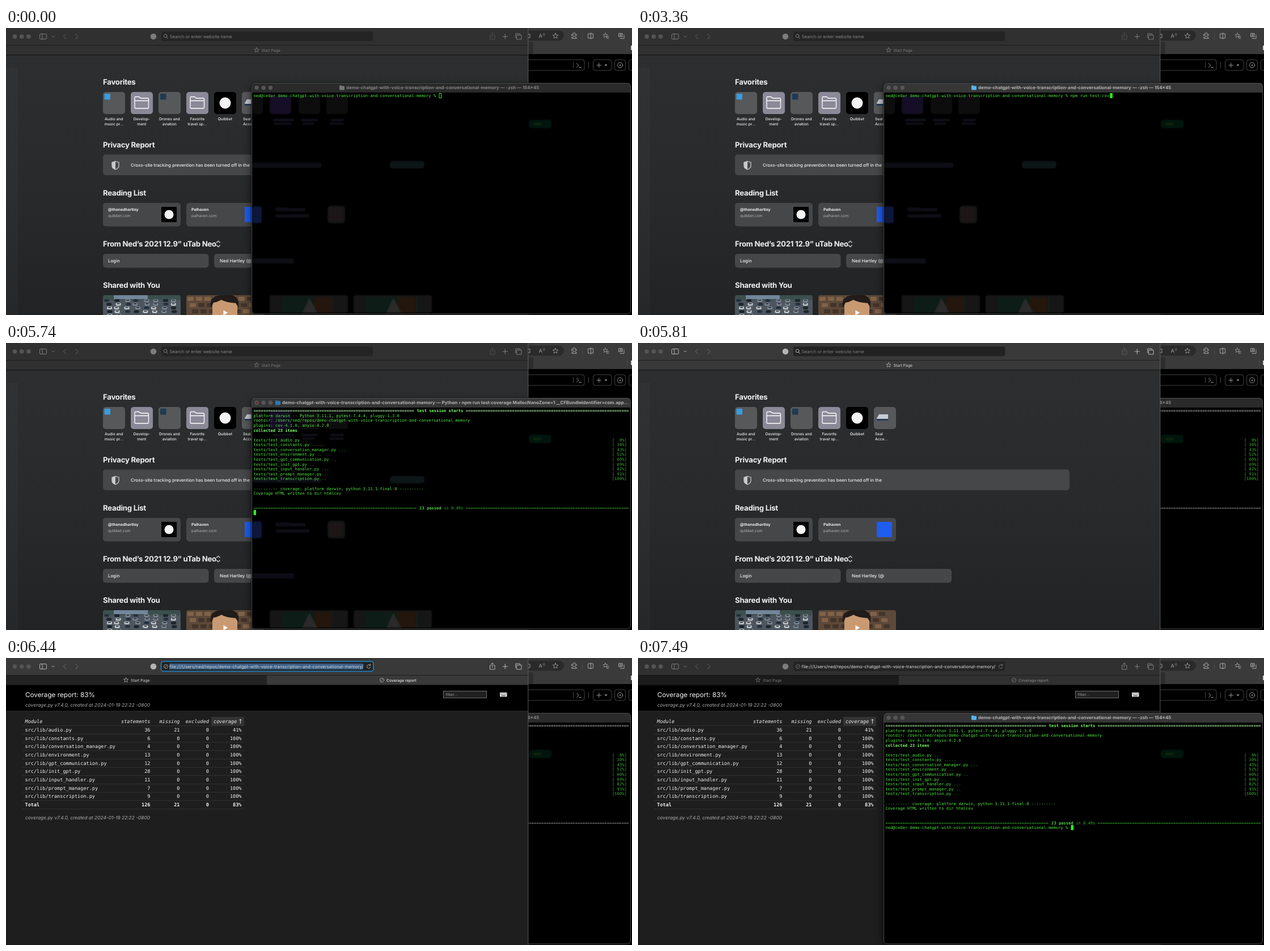
Animation of 1104 by 507 pixels, one loop 8000 ms. Source, as an HTML page:

```html
<!DOCTYPE html>
<html lang="en">
<head>
<meta charset="utf-8">
<title>Test coverage demo</title>
<style>
html, body { margin: 0; width: 100%; height: 100%; overflow: hidden; background: #000; }
svg { position: absolute; inset: 0; width: 100%; height: 100%; text-rendering: geometricPrecision; }
text { font-family: Inter, "Open Sans", sans-serif; white-space: pre; }
.mono, .row text, #prompt { font-family: "DejaVu Sans Mono", monospace; }
.row text, #prompt { font-size: 7.147px; fill: #4fe83f; }
.row .bold { font-weight: 700; fill: #7dff6c; }
.row .ansi { fill: #39b030; }
.row .strong { font-weight: 700; fill: #52d045; }
.row .rule { fill: #a3e39a; }
.line { fill: none; stroke: var(--ink); stroke-linecap: round; stroke-linejoin: round; }
.dim { stroke: var(--dim); }

#browser { z-index: 1; --bar: #303030; --tab: #1b1b1b; --ink: #7c7c7c; --dim: #4d4d4d; --label: #7b7b7b;
  --field: #242424; --hint: #868686; --red: #555; --amber: #555; --green: #555; --url: #dadada; }
#browser.on { z-index: 3; --bar: #393939; --tab: #232323; --ink: #b4b4b4; --dim: #5a5a5a; --label: #d8d8d8;
  --field: #222; --hint: #7c7c7c; }
#terminal { z-index: 2; --bar: #2a2a2b; --ink: #858585; --folder: #777; --red: #565656; --amber: #565656; --green: #565656; }
#terminal.on { --bar: #363637; --ink: #b4b4b4; --folder: #55b4ea; }
#terminal.busy { --folder: #2f76ad; }
.on { --red: #fe5f57; --amber: #febc2e; --green: #28c840; }
#terminal:not(.on) .rule, #terminal:not(.on) .row:last-of-type .ansi { fill: #939793; }

.page, .ring, #pick, #dot { display: none; }
.start .p-start, .blank .p-blank, .report .p-report { display: inline; }
#browser.on:not(.start) .ring { display: inline; }
#browser.on.report #pick, #terminal.busy #dot { display: inline; }
#browser.on.report .old { fill: #8b8b8b; }
</style>
</head>
<body>
<svg id="desk" viewBox="0 0 1104 507"></svg>
<svg id="browser" viewBox="0 0 1104 507"></svg>
<svg id="terminal" viewBox="0 0 1104 507"></svg>
<script>
const $ = id => document.getElementById(id);
const REPO = 'demo-chatgpt-with-voice-transcription-and-conversational-memory';
const PROMPT = `ned@cedar ${REPO} % `;
const COMMAND = 'npm run test:coverage';
const KEYS = [1190, 1470, 1680, 1820, 1890, 2030, 2240, 2310, 2310, 2450, 2520,
  2660, 2870, 3080, 3220, 3360, 3570, 3640, 3850, 3920, 3990];
const OUTPUT = [[5040, 1], [5110, 4], [5180, 5], [5250, 9], [5320, 12], [5390, 15], [5670, 21]];
// module, tests, statements, missing
const MODULES = [['audio', 2, 36, 21], ['constants', 5, 6, 0], ['conversation_manager', 3, 4, 0],
  ['environment', 2, 13, 0], ['gpt_communication', 2, 12, 0], ['init_gpt', 2, 28, 0],
  ['input_handler', 3, 11, 0], ['prompt_manager', 2, 7, 0], ['transcription', 2, 9, 0]];

const rect = (x, y, w, h, fill, r = 0, more = '') =>
  `<rect x="${x}" y="${y}" width="${w}" height="${h}" rx="${r}" style="fill:${fill}" ${more}/>`;
const disc = (x, y, r, fill) => `<circle cx="${x}" cy="${y}" r="${r}" style="fill:${fill}"/>`;
const path = (d, w = 1, cls = '') => `<path class="line ${cls}" d="${d}" stroke-width="${w}"/>`;
// y is the middle of the lower-case line
const text = (x, y, s, size, fill, weight = 400, more = '') =>
  `<text x="${x}" y="${y + size * .36}" font-size="${size}" font-weight="${weight}" style="fill:${fill}" ${more}>${s}</text>`;
const MID = 'text-anchor="middle"', END = 'text-anchor="end"';
const lights = (x, y, r) => ['red', 'amber', 'green'].map((c, i) => disc(x + i * 12.2, y, r, `var(--${c})`)).join('');
const star = (x, y, r, w = .8) => path('M' + Array.from({ length: 10 }, (_, i) => {
  const a = i * Math.PI / 5, k = i % 2 ? r * .45 : r;
  return `${(x + k * Math.sin(a)).toFixed(2)} ${(y - k * Math.cos(a)).toFixed(2)}`;
}).join('L') + 'Z', w);
let seed = 7;
const rnd = () => (seed = seed * 16807 % 2147483647) / 2147483647;

function desk() {
  return `<g style="--ink:#a5a5a5;--dim:#555">` + rect(900, 0, 204, 46, '#3a3a3a') + rect(900, 25, 30, 21, '#2d2d2d', 4) +
    rect(880, 4.5, 104, 18, '#2a2a2a', 9) +
    path('M921 11h3v6h-3', .9) + text(939.5, 14, 'A', 9, '#a5a5a5') + path('M947 10q1.5 1.5 0 3M949 9q2.2 2.500 0 5', .6) +
    star(969, 14, 5) +
    path('M998 11h2.500a1.800 1.800 0 1 1 3 0h2.500v2.500a1.800 1.800 0 1 0 0 3v2h-8v-2.500a1.800 1.800 0 1 0 0-2.500z', 1) +
    path('M1016.500 9v10', .7, 'dim') + path('M1027 10h8.500v8h-8.500zM1031.300 8.500v11', 1) +
    star(1057, 13, 4.200) + path('M1059 15h4M1059 18h4', 1) +
    path('M1081 9.500h6v6h-6zM1083.500 18.500h6.500v-6.500M1084 10.500v4M1082 12.500h4', 1) +
    path('M1095.500 30v9', .7, 'dim') + rect(1102, 31, 2, 8, '#d9d0c4') +
    `<g fill="none" stroke="#4b4b4b" stroke-width=".9"><rect x="860" y="56" width="160" height="19" rx="4"/>
     <path d="M1000.500 60v11M1027.500 60v11"/><rect x="1035.500" y="56" width="32.500" height="19" rx="4"/>
     <rect x="1073.500" y="56" width="19" height="19" rx="4"/><rect x="1098.500" y="56" width="19" height="19" rx="4"/></g>` +
    path('M1006.500 62.500l3.500 3.300-3.500 3.300M1010.500 69.500h4', .9) + path('M1042 65.800h7.500M1045.700 62v7.500', .9) +
    `<path d="M1055.500 64.500h5l-2.500 2.800z" fill="#a5a5a5"/>` +
    path('M1087.700 65.700a4.600 4.600 0 1 1-9.200 0a4.600 4.600 0 1 1 9.200 0', .9) + disc(1083.1, 65.7, 1.1, '#a5a5a5') + '</g>';
}

function folderTile(x) {
  const L = x + 7;
  return rect(x, 113, 39, 39, '#8b8998', 5) +
    `<path d="M${L} 125v-2q0-1.500 1.500-1.500h6l3 2.500h12q2 0 2 2v14q0 2-2 2h-20.500q-2 0-2-2zM${L} 128.500h24.500" fill="none" stroke="#fff" stroke-width="1.300"/>`;
}

function traffic() {
  let s = rect(171, 472, 137, 40, '#4d565f', 4) + rect(171, 472, 137, 9, '#3b4f4c', 4) + rect(190, 472, 60, 7, '#71869a');
  for (let i = 0; i < 34; i++) {
    const y = 479 + (i >> 3) * 6.5, x = 173 + (i % 8) * 16.5 + rnd() * 6, c = ['#20262d', '#c8ccd0', '#7f8994', '#2b3947'][rnd() * 4 | 0];
    s += rect(x, y, 9, 5, c, 1.8) + rect(x + 2, y + 1, 5, 1.5, '#19222b');
  }
  return s;
}

function portrait() {
  let s = rect(318, 472, 137, 40, '#5d4939', 4);
  for (let i = 0; i < 24; i++) s += rect(320 + (i % 8) * 15 + (i >> 3) * 4, 475 + (i >> 3) * 11, 11, 7, rnd() > .5 ? '#806248' : '#443429', 1);
  return s + `<path d="M364 507v-17q4-16 22-16t22 16v17z" fill="#c99a72"/>
    <path d="M361 494q-3-20 16-22h22q14 5 11 22l-5-8q-18-1-25-6-9 5-14 5z" fill="#211c19"/>
    <path d="M383.500 498.500v9l7.500-4.500z" fill="#fff"/>`;
}

function startPage() {
  const gray = '#464748', title = (y, s) => text(171, y, s, 13.2, '#f1f1f1', 700, 'letter-spacing="-.25"');
  const names = [['Audio and', 'music pr...'], ['Develop-', 'ment'], ['Drones and', 'aviation'],
    ['Favorite', 'travel sp...'], ['Quibbet'], ['Seal', 'Acce...']];
  let s = rect(0, 48, 921, 459, 'url(#paper)') + rect(0, 70, 21, 437, '#ffffff05') +
    title(95.5, 'Favorites') + title(206, 'Privacy Report') + title(291.5, 'Reading List') +
    title(381.5, 'From Ned’s 2021 12.9” uTab Neo') + title(454.5, 'Shared with You');
  [0, 2, 5].forEach(i => s += rect(171 + i * 49, 113, 39, 39, '#57585a', 5));
  s += folderTile(220) + folderTile(318) + rect(367, 113, 39, 39, '#000', 5) + disc(386.5, 132.5, 10, '#f4f4f4') +
    rect(173.5, 116, 10.5, 10.5, '#3a9bdc', 1) + rect(272, 116, 10.5, 10.5, '#1e3a52', 1) +
    `<path d="M421 133l4-7h16v10h-19z" fill="#c5ccd3"/><path d="M421 134h20v3h-20z" fill="#263c55"/>`;
  names.forEach((n, i) => n.forEach((w, j) =>
    s += i < 5 ? text(190.3 + i * 49, 160.5 + j * 9, w, 6.7, '#f0f0f0', 500, MID) : text(418, 160.5 + j * 9, w, 6.7, '#f0f0f0', 500)));
  s += rect(171, 223.5, 590, 36.5, gray, 5) +
    `<path d="M193 235.500l6 2v6q0 4-6 6.500q-6-2.500-6-6.500v-6z" fill="none" stroke="#c9c9c9" stroke-width="1.300"/>
     <path d="M193 235.500v14.500q-6-2.500-6-6.500v-6z" fill="#c9c9c9"/>` +
    text(220, 242, 'Cross-site tracking prevention has been turned off in the', 7.78, '#f0f0f0', 500);
  [[171, '@thenedhartley', 'quibbet.com'], [318, 'Palhaven', 'palhaven.com']].forEach(([x, a, b]) =>
    s += rect(x, 309, 137, 41.5, gray, 5) + text(x + 9, 320.5, a, 6.8, '#f0f0f0', 700) + text(x + 9, 331.5, b, 6.7, '#b5b5b5'));
  return s + rect(274, 316, 27, 27, '#000', 1) + disc(287.5, 329.5, 8, '#f4f4f4') + rect(421, 316, 27, 27, '#1f5df0', 1) +
    `<path d="M371 379.500l3.300-3.200 3.300 3.200M371 383.500l3.300 3.200 3.300-3.200" fill="none" stroke="#e5e5e5" stroke-width="1.100"/>` +
    rect(171, 399, 186.5, 24.5, gray, 5) + rect(367, 399, 186, 24.5, gray, 5) +
    text(180, 411.5, 'Login', 7.8, '#f0f0f0', 500) + text(377, 411.5, 'Ned Hartley (@', 7.8, '#f0f0f0', 500) + traffic() + portrait();
}

function reportPage() {
  const stamp = 'coverage.py v7.4.0, created at 2024-01-19 22:22 -0800', it = 'font-style="italic"';
  const cell = (x, y, s, more = '', weight = 400) => text(x, y, s, 8.55, '#f3f3f3', weight, `class="mono" ${more}`);
  const cols = [254.5, 306.5, 358, 415.5];
  let s = rect(0, 48, 921, 459, '#1e1e1e') + rect(0, 48, 921, 45.5, '#000') + rect(0, 93.5, 921, .8, '#333') +
    text(34, 65, 'Coverage report: 83%', 11.7, '#f5f5f5', 400) + text(34, 82.5, stamp, 8.36, '#b0b0b0', 400, it) +
    rect(771.5, 58.5, 76, 12, '#202020', 0, 'stroke="#7b7b7b" stroke-width=".9"') + text(775.5, 64.7, 'filter...', 7, '#9a9a9a') +
    rect(871, 61, 12.5, 7.5, '#eee', 1);
  for (let i = 0; i < 10; i++) s += rect(872.2 + i % 5 * 2.2, 62.4 + (i / 5 | 0) * 2, 1, 1, '#222');
  s += rect(873.5, 66.4, 7.5, .9, '#222') + rect(362, 104, 58, 15, '#343434') + cell(33.5, 112, 'Module', it);
  ['statements', 'missing', 'excluded'].forEach((h, i) => s += cell(cols[i], 112, h, `${it} ${END}`));
  s += cell(366, 112, 'coverage', it) + `<path d="M413.500 115.500v-7M411.500 110.300l2-2.300 2 2.300" fill="none" stroke="#eee" stroke-width=".9"/>`;
  const rows = MODULES.map(([n, , st, miss]) => [`src/lib/${n}.py`, st, miss]);
  rows.push(['Total', 126, 21]);
  rows.forEach(([n, st, miss], i) => {
    const y = 126.8 + i * 14.7, w = i == 9 ? 700 : 400;
    s += rect(29, y - 7.6, 391, .7, '#3a3a3a') + cell(33.5, y, n, '', w);
    [st, miss, 0, Math.floor(100 * (st - miss) / st) + '%'].forEach((v, j) => s += cell(cols[j], y, v, END, w));
  });
  return s + rect(29, 266.5, 391, .7, '#3a3a3a') + text(34, 282, stamp, 8.36, '#b0b0b0', 400, it);
}

function browser() {
  const url = `file:///Users/ned/repos/${REPO}/`;
  const compass = (x, y) => path(`M${x - 3.6} ${y}a3.600 3.600 0 1 1 7.200 0a3.600 3.600 0 1 1-7.200 0M${x - 1.5} ${y + 1.5}l3-3`, .8);
  return `<defs><linearGradient id="paper" x2="0" y2="1"><stop stop-color="#2d2e2f"/><stop offset=".5" stop-color="#282a2b"/>
    <stop offset="1" stop-color="#222324"/></linearGradient></defs>` + rect(0, 0, 921, 507, '#1e1e1e') +
    `<g class="page p-start">${startPage()}</g><g class="page p-report">${reportPage()}</g>` +
    rect(0, 0, 921, 48, 'var(--bar)') + `<rect id="oldTab" y="30" height="18" style="fill:var(--tab)"/>` +
    rect(0, 30, 921, .8, '#171717') + rect(0, 47.3, 921, 1, '#101010') + lights(15.5, 15, 3.8) +
    path('M61 10.500h9q1.500 0 1.500 1.500v6q0 1.500-1.500 1.500h-9q-1.500 0-1.500-1.500v-6q0-1.500 1.500-1.500zM64 10.500v9', 1) +
    path('M81.200 14l2 2 2-2', 1) + path('M105.500 11l-4 4 4 4M123 11l4 4-4 4', 1.2, 'dim') + disc(260, 15, 5.3, 'var(--ink)') +
    rect(274, 6.3, 373.5, 17, 'var(--field)', 4) +
    `<rect class="ring" x="273.500" y="6" width="374.500" height="17.600" rx="4.500" fill="none" stroke="#2474ab" stroke-width="2"/>` +
    `<g class="page p-start p-blank">` + path('M284 14a2.900 2.900 0 1 1-5.800 0a2.900 2.900 0 1 1 5.800 0M283.200 16.200l2.600 2.600', 1) +
    text(288.5, 15, 'Search or enter website name', 7.8, 'var(--hint)') + `<rect class="ring" x="288.700" y="10" width=".9" height="10" fill="#3d9be0"/></g>` +
    `<g class="page p-report"><rect id="pick" x="288" y="9.800" width="342" height="10.400" fill="#3b5f86"/>` + compass(282, 15) +
    text(288.5, 15, url, 7.79, 'var(--url)') + path('M642.500 13a3.300 3.300 0 1 0 .5 3M642.700 10.700v2.500h-2.500', .9) + '</g>' +
    `<g class="page p-start p-blank">${path('M855.500 13h-2v7h8.500v-7h-2M857.700 16.500v-7.500M855.500 11l2.200-2.200 2.200 2.200', 1, 'dim')}</g>` +
    `<g class="page p-report">${path('M855.500 13h-2v7h8.500v-7h-2M857.700 16.500v-7.500M855.500 11l2.200-2.200 2.200 2.200', 1)}</g>` +
    path('M876 15h8.500M880.200 10.700v8.500', 1.1) + path('M901 12.500h8v7.500h-8zM898.800 17.500v-7.500h7.500v2', 1) +
    `<g id="startTab">` + star(-18.5, 39, 4.3) + text(-10, 39.3, 'Start Page', 6.8, 'var(--label)', 400, 'class="old"') + '</g>' +
    `<g class="page p-report">` + compass(663, 39) + text(671, 39.3, 'Coverage report', 6.7, 'var(--label)', 600) + '</g>' +
    rect(920.4, 0, .9, 507, '#626262');
}

const CW = 4.303, LH = 8.576, LEFT = 436.5, TOP = 115.3;
const cell = (row, col, s, cls = '') => `<text class="${cls}" x="${LEFT + col * CW}" y="${TOP + row * LH + 7}">${s}</text>`;

function output() {
  const eq = n => '='.repeat(n), rows = [];
  const add = (...runs) => rows.push(runs.map(r => cell(rows.length, ...r)).join(''));
  add([0, eq(66), 'rule bold'], [67, 'test session starts', 'bold'], [87, eq(67), 'rule bold']);
  add([0, 'platform darwin -- Python 3.11.1, pytest-7.4.4, pluggy-1.3.0']);
  add([0, `rootdir: /Users/ned/repos/${REPO}`]);
  add([0, 'plugins: cov-4.1.0, anyio-4.2.0']);
  add([0, 'collected 23 items', 'bold']);
  add();
  let done = 0;
  MODULES.forEach(([n, k]) => {
    const name = `tests/test_${n}.py `;
    done += k;
    add([0, name], [name.length, '.'.repeat(k), 'ansi'], [147, `[${String(Math.floor(done * 100 / 23)).padStart(3)}%]`, 'ansi']);
  });
  add();
  add([0, '---------- coverage: platform darwin, python 3.11.1-final-0 ----------']);
  add([0, 'Coverage HTML written to dir htmlcov']);
  add();
  add();
  add([0, eq(67), 'ansi'], [68, '23 passed', 'strong'], [78, 'in 0.49s', 'ansi'], [87, eq(67), 'ansi']);
  return rows.map(r => `<g class="row">${r}</g>`).join('');
}

function ghosts() {
  const tiles = [434, 465, 516, 565].map((x, i) => rect(x, 120, i ? 38 : 19, 32, ['#0c0d0e', '#120b26', '#0b0c0d', '#0d0e0f'][i], 5)).join('');
  const blobs = [[470, 160, 38, 5], [472, 167, 32, 4], [520, 160, 30, 5], [522, 167, 22, 4], [572, 160, 24, 5], [570, 167, 26, 4],
    [434, 238, 122, 9], [475, 317, 25, 7], [500, 318, 28, 6], [475, 329, 60, 6], [434, 407, 74, 9]];
  return `<g class="page p-start" filter="url(#soft)">` + tiles + blobs.map(b => rect(...b, '#0f1112', 3)).join('') +
    rect(677, 235, 61, 13, '#101315', 5) + rect(434, 315, 17, 30, '#08123a', 4) + rect(567, 314, 31, 31, '#131212', 5) +
    rect(571, 319, 22, 22, '#1d1512', 4) +
    [465, 613].map(x => rect(x, 472, 138, 31, '#141515', 4) + rect(x + 22, 475, 90, 28, '#0d1f12') +
      rect(x + 78, 475, 32, 28, '#24180d') + `<path d="M${x + 58} 503l12-26 14 26z" fill="#2a2c2b"/>`).join('') + '</g>';
}

function terminal() {
  const folder = x => `<path d="M${x} 102.500q0-1 1-1h2.500l1 1h3.500q1 0 1 1v5q0 1-1 1h-7q-1 0-1-1z" style="fill:var(--folder)"/>`;
  const title = (x, s) => folder(x - 12) + text(x, 105.5, `${REPO} — ${s}`, 7.95, 'var(--ink)', 700);
  return `<defs><filter id="soft"><feGaussianBlur stdDeviation="1.100"/></filter>
    <filter id="shade" x="-10%" y="-10%" width="120%" height="125%"><feGaussianBlur stdDeviation="7"/></filter></defs>` +
    rect(431, 102, 673, 410, '#000', 8, 'opacity=".5" filter="url(#shade)"') +
    rect(432.5, 96.5, 669.5, 409, '#000', 6.5) + `<g filter="url(#soft)">${rect(922, 162, 40, 15, '#041507', 5)}${rect(930, 167, 14, 5, '#0a240d', 2)}</g>` + ghosts() +
    `<path d="M433.500 114v-11q0-6 6-6h656q6 0 6 6v11z" style="fill:var(--bar)"/>` + lights(442, 105.5, 3.7) +
    `<circle id="dot" cx="442" cy="105.500" r="1.500" fill="#6d1510"/>` +
    `<g id="idle">${title(600, '-zsh — 154×45')}</g>` +
    `<g id="running">${title(487, 'Python • npm run test:coverage MallocNanoZone=1 __CFBundleIdentifier=com.app...')}</g>` +
    `<g>${output()}</g><text id="prompt" x="${LEFT}"></text><rect id="cursor"/>` +
    `<rect x="433.500" y="97.500" width="668" height="407.500" rx="6" fill="none" stroke="#555" stroke-width=".9"/>`;
}

$('desk').innerHTML = desk();
$('browser').innerHTML = browser();
$('terminal').innerHTML = terminal();
const rows = document.querySelectorAll('.row');
const show = (el, on) => el.style.display = on ? 'inline' : 'none';
const put = (el, o) => { for (const k in o) el.setAttribute(k, o[k]); };

function draw() {
  const t = Math.floor(performance.now() % 8000 / 70) * 70;
  const front = t >= 5810 && t < 7350, focus = t >= 70 && !front, busy = t >= 4900 && t < 5810;
  const page = t < 5880 ? 'start' : t < 6020 ? 'blank' : 'report';
  $('browser').setAttribute('class', `${page} ${front ? 'on' : ''}`);
  $('terminal').setAttribute('class', `${page} ${focus ? 'on' : ''} ${busy ? 'busy' : ''}`);

  // the new tab slides in from the right
  const u = Math.min(1, Math.max(0, (t - 5810) / 238)), split = 921 - 461 * u * u * (3 - 2 * u);
  $('oldTab').setAttribute('width', u ? split : 0);
  $('startTab').setAttribute('transform', `translate(${split / 2})`);

  const lines = OUTPUT.reduce((n, [at, k]) => t >= at ? k : n, 0);
  rows.forEach((r, i) => show(r, i < lines));
  show($('idle'), !busy);
  show($('running'), busy);

  const typed = t < 4970 ? KEYS.filter(k => k <= t).length : 0;
  const ready = t < 4970 || t >= 5810, at = t < 4970 ? 0 : 21;
  $('prompt').textContent = ready ? PROMPT + COMMAND.slice(0, typed) : '';
  $('prompt').setAttribute('y', TOP + at * LH + 7);

  const entered = t >= 4830 && t < 4970;
  const row = entered ? 1 : ready ? at : lines, col = ready && !entered ? PROMPT.length + typed : 0;
  const pad = focus ? 0 : .5;
  put($('cursor'), { x: LEFT + col * CW + pad, y: TOP + row * LH + pad - .3, width: CW - pad * 2 + .2, height: LH - pad * 2 + .4,
    fill: focus ? '#28fe14' : 'none', stroke: focus ? 'none' : '#28fe14' });
  show($('cursor'), t < 1050 || t >= 1190);
  requestAnimationFrame(draw);
}
draw();
</script>
</body>
</html>
```
